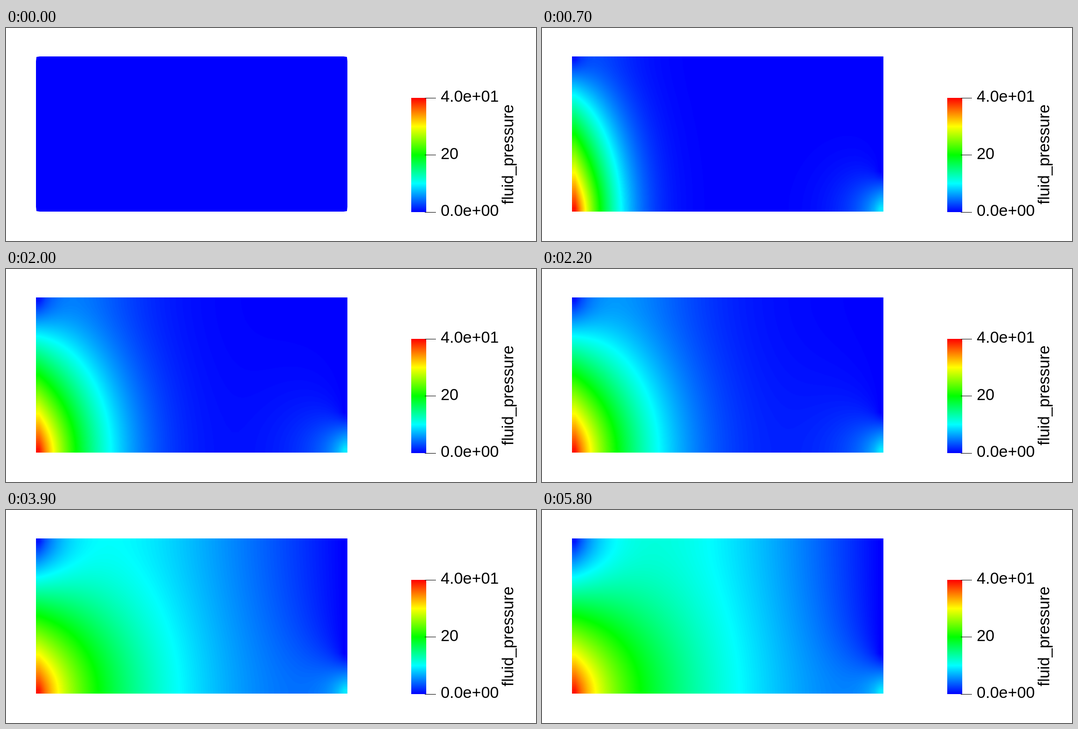
An HTML page with a canvas that plays this animation: 1096x442 px, repeating every 8000 ms.

```html
<!DOCTYPE html>
<html lang="en">
<head>
<meta charset="utf-8">
<title>Fluid pressure</title>
<style>
  html, body { margin: 0; width: 100%; height: 100%; overflow: hidden; background: #fff; }
  canvas { position: absolute; left: 62px; top: 59px; }
  svg { position: absolute; left: 0; top: 0; }
  text { font: 33px "Liberation Sans", Arial, sans-serif; }
</style>
</head>
<body>
<canvas id="field" width="644" height="322"></canvas>
<svg width="1096" height="442">
  <defs>
    <linearGradient id="rainbow" x1="0" y1="1" x2="0" y2="0">
      <stop offset="0" stop-color="#00f"/>
      <stop offset=".25" stop-color="#0ff"/>
      <stop offset=".5" stop-color="#0f0"/>
      <stop offset=".75" stop-color="#ff0"/>
      <stop offset="1" stop-color="#f00"/>
    </linearGradient>
  </defs>
  <rect x="838" y="145" width="31" height="237" fill="url(#rainbow)"/>
  <path d="M866 145.5h23M866 263.5h23M866 382.5h23" stroke="#000"/>
  <text x="899" y="153">4.0e+01</text>
  <text x="899" y="272">20</text>
  <text x="899" y="390">0.0e+00</text>
  <text transform="translate(1049 366) rotate(-90)">fluid_pressure</text>
  <path id="corners" fill="#fff" d="M62 59h8l-7 1-1 9zM706 59h-8l7 1 1 9zM62 381h8l-7-1-1-9zM706 381h-8l7-1 1-9z"/>
</svg>
<script>
const NX = 50, NY = 25;   // cells; pressure lives at their centres
const STEP = 100, COUNT = 80;
const DIFFUSION = 3.7;    // cells squared per unit of time
const SLOW_STEPS = 20;    // unit time steps, then steps of five units
const SUBSTEPS = 4;

const canvas = document.getElementById('field');
const corners = document.getElementById('corners');
const ctx = canvas.getContext('2d');
const { width: W, height: H } = canvas;
const image = ctx.createImageData(W, H);

// Blue, cyan, green, yellow, red in 256 levels.
const ramp = v => Math.round(255 * Math.max(0, Math.min(1, v)));
const palette = Array.from({ length: 256 }, (_, i) => {
  const v = i / 255 * 4;
  return [ramp(v - 2), ramp(v < 2 ? v : 4 - v), ramp(2 - v)];
});

// One implicit diffusion step: fixed pressure in the side cells, no flow above and below.
function diffuse(prev, dt) {
  const p = prev.slice(), a = DIFFUSION * dt;
  for (let j = 0; j < NY; j++) {
    const depth = (j + 0.5) / NY;
    p[j * NX] = depth;
    p[j * NX + NX - 1] = Math.max(0, depth - 0.75);
  }
  for (let pass = 0; pass < 60; pass++) {
    for (let j = 0; j < NY; j++) {
      const up = Math.max(j - 1, 0) * NX;
      const down = Math.min(j + 1, NY - 1) * NX;
      for (let i = 1; i < NX - 1; i++) {
        const k = j * NX + i;
        p[k] = (prev[k] + a * (p[k - 1] + p[k + 1] + p[up + i] + p[down + i])) / (1 + 4 * a);
      }
    }
  }
  return p;
}

const states = [new Float64Array(NX * NY)];
for (let n = 1; n < COUNT; n++) {
  const dt = (n > SLOW_STEPS ? 5 : 1) / SUBSTEPS;
  let p = states[n - 1];
  for (let s = 0; s < SUBSTEPS; s++) p = diffuse(p, dt);
  states.push(p);
}

// Cell on the near side of a pixel, and the fraction towards the next; flat beyond the outer centres.
function locate(pixel, size, cells) {
  const v = Math.max(0, Math.min(cells - 1, (pixel + 0.5) / size * cells - 0.5));
  const cell = Math.min(Math.floor(v), cells - 2);
  return [cell, v - cell];
}

function draw(p) {
  const mix = (a, b, f) => a + (b - a) * f;
  for (let y = 0, o = 0; y < H; y++) {
    const [j, fy] = locate(y, H, NY);
    for (let x = 0; x < W; x++, o += 4) {
      const [i, fx] = locate(x, W, NX);
      const k = j * NX + i;
      const value = mix(mix(p[k], p[k + 1], fx), mix(p[k + NX], p[k + NX + 1], fx), fy);
      const rgb = palette[Math.min(255, Math.floor(value * 256))];
      image.data[o] = rgb[0];
      image.data[o + 1] = rgb[1];
      image.data[o + 2] = rgb[2];
      image.data[o + 3] = 255;
    }
  }
  ctx.putImageData(image, 0, 0);
}

let shown = -1;
function tick() {
  const n = Math.floor(performance.now() / STEP) % COUNT;
  if (n !== shown) {
    shown = n;
    draw(states[n]);
    corners.style.display = n ? 'none' : '';
  }
  requestAnimationFrame(tick);
}
tick();
</script>
</body>
</html>
```
